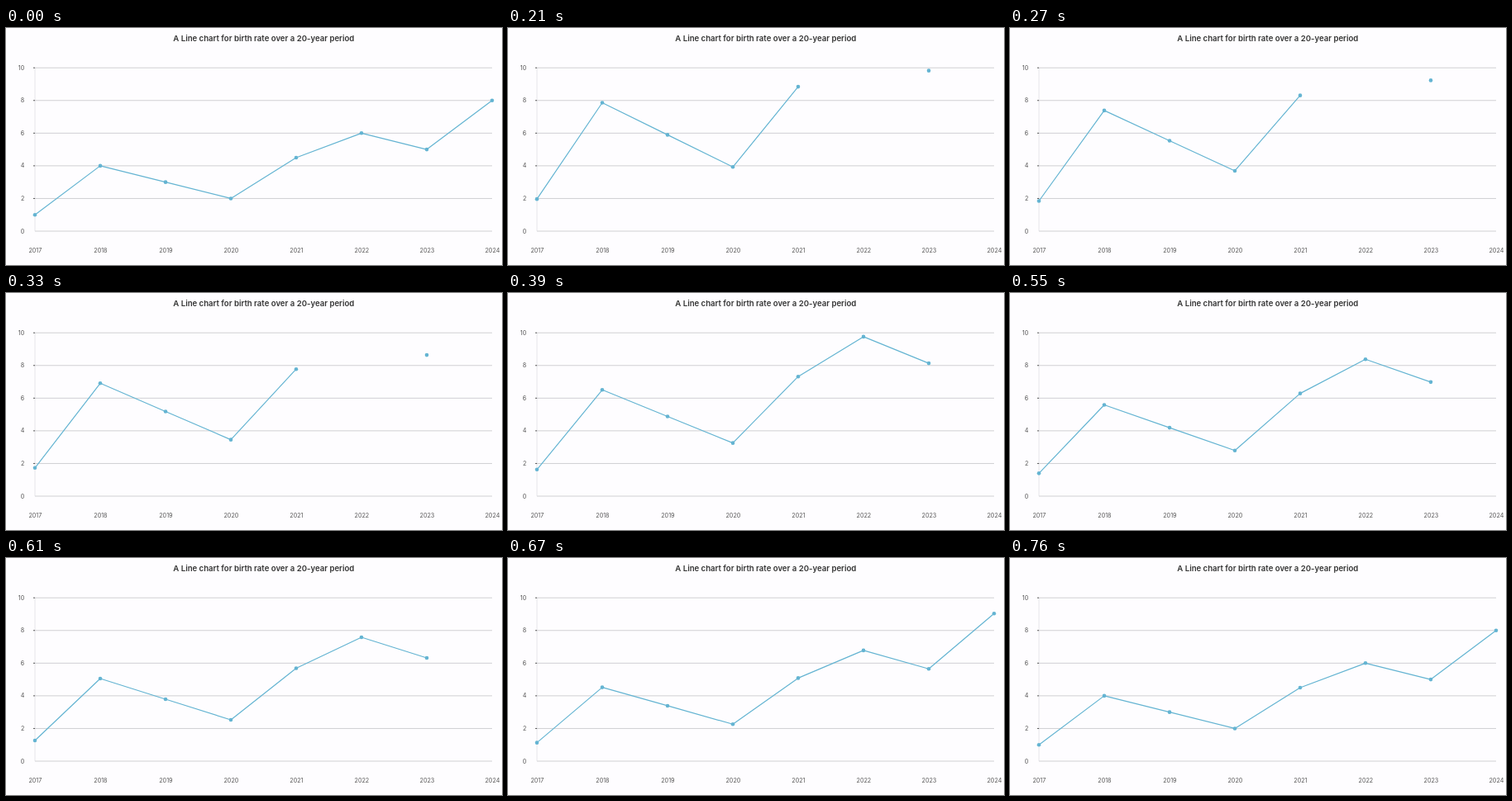
An HTML page for the animation above (1.94 s loop, 600 px wide and 287 px high).

```html
<!DOCTYPE html>
<html lang="en">
<head>
<meta charset="utf-8">
<title>Line chart</title>
<style>
  html, body { margin: 0; width: 100%; height: 100%; overflow: hidden; background: #fefdff; }
  svg { display: block; width: 600px; height: 287px; font: 7.2px Inter, sans-serif; fill: #555; }
  .title { font-size: 9.6px; font-weight: 600; fill: #333; text-anchor: middle; }
  .year { text-anchor: middle; }
  .value { text-anchor: end; }
  .grid { stroke: #d0d0d3; }
  .axis { stroke: #e6e6ea; }
  .tick { stroke: #555; }
  .series { fill: none; stroke: #64b4d2; stroke-width: 1.2; stroke-linejoin: round; }
  .dot { fill: #64b4d2; }
</style>
</head>
<body>
<svg viewBox="0 0 600 287">
  <text class="title" x="311.8" y="16.2">A Line chart for birth rate over a 20-year period</text>
</svg>
<script>
const LOOP = 1940, START = 210, STEP = 30, MAX = 10;
const rates = [1, 4, 3, 2, 4.5, 6, 5, 8];
// [step, scale]: the values shrink from about double to their final size
const scaleKeys = [[0, 1.965], [4, 1.728], [8, 1.526], [10, 1.397], [14, 1.13], [16, 1]];

const svg = document.querySelector('svg');
const xAt = i => 35 + 79 * i;
const yAt = v => 246 - 19.78 * v;

function add(tag, className, attrs, text = '') {
  const el = document.createElementNS('http://www.w3.org/2000/svg', tag);
  el.setAttribute('class', className);
  for (const name in attrs) el.setAttribute(name, attrs[name]);
  el.textContent = text;
  return svg.appendChild(el);
}

add('path', 'axis', { d: 'M35 48V246' });
for (let v = 0; v <= MAX; v += 2) {
  const y = yAt(v);
  add('path', 'grid', { d: `M35 ${y}H588` });
  if (v) add('path', 'tick', { d: `M33 ${y}h2` });
  add('text', 'value', { x: 22.3, y: y + 2.5 }, v);
}
rates.forEach((_, i) => add('text', 'year', { x: xAt(i) + 0.4, y: 271.8 }, 2017 + i));

const series = add('path', 'series', {});
const dots = rates.map((_, i) => add('circle', 'dot', { cx: xAt(i), r: 2.3 }));

// The motion advances in steps, with one longer hold at 450 ms.
function stepAt(t) {
  if (t < 450) return Math.floor((t - START) / STEP);
  return t < 520 ? 8 : 9 + Math.floor((t - 520) / STEP);
}

function scaleAt(t) {
  const step = stepAt(t);
  if (t < START || step >= 16) return 1;
  const next = scaleKeys.findIndex(([s]) => s > step);
  const [s0, k0] = scaleKeys[next - 1], [s1, k1] = scaleKeys[next];
  return k0 + (k1 - k0) * (step - s0) / (s1 - s0);
}

function draw(t) {
  const scale = scaleAt(t);
  let path = '', joined = false;
  rates.forEach((rate, i) => {
    const value = rate * scale, visible = value <= MAX, y = yAt(value);
    dots[i].setAttribute('cy', y);
    dots[i].style.display = visible ? '' : 'none';
    if (visible) path += `${joined ? 'L' : 'M'}${xAt(i)} ${y}`;
    joined = visible;
  });
  series.setAttribute('d', path);
}

const origin = performance.now();
function frame() {
  draw((performance.now() - origin) % LOOP);
  requestAnimationFrame(frame);
}
frame();
</script>
</body>
</html>
```
